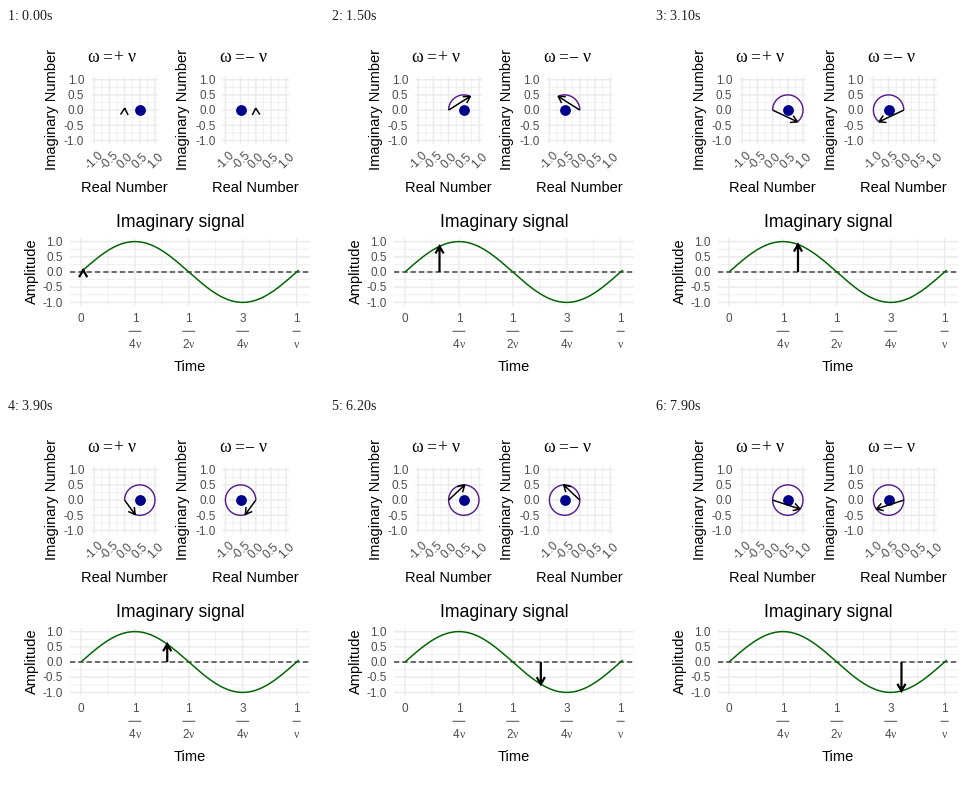
A matplotlib script that plays this animation: 318 by 362 pixels, repeating every 8 s.

```python
import numpy as np
import matplotlib.pyplot as plt
from matplotlib.animation import FuncAnimation

W, H, DPI = 318, 362, 100
FRAMES, INTERVAL = 80, 100
PX = 72 / DPI                      # points per pixel
UNIT = 30.4                        # pixels per data unit
TICKS = np.linspace(-1, 1, 5)
MINOR = TICKS[:-1] + 0.25
GRID, GREY = "#ebebeb", "#4d4d4d"
AXIS, SMALL, TITLE = 14.67, 11.73, 17.6

fig = plt.figure(figsize=(W / DPI, H / DPI), dpi=DPI, facecolor="white")
ax = fig.add_axes([0, 0, 1, 1])
ax.set_xlim(0, W)
ax.set_ylim(H, 0)
ax.axis("off")


def line(x, y, color, width, z=1, **kw):
    kw.setdefault("solid_capstyle", "butt")
    return ax.plot(x, y, color=color, lw=width * PX, zorder=z, snap=False, **kw)[0]


def label(x, y, s, size, color="black", ha="center", va="baseline",
          rot=0, font="Liberation Sans"):
    ax.text(x, y, s, fontsize=size * PX, color=color, ha=ha, va=va,
            rotation=rot, rotation_mode="anchor", family=font, zorder=6)


def grid(x0, x1, y0, y1, xs, ys, width):
    for x in xs:
        line([x, x], [y0, y1], GRID, width)
    for y in ys:
        line([x0, x1], [y, y], GRID, width)


def y_labels(right, mid):
    for t in TICKS:
        label(right, mid - t * UNIT + 4.2, f"{t:.1f}", SMALL, GREY, ha="right")


def arrow(color, width):
    return line([], [], color, width, 5, solid_joinstyle="miter")


def set_arrow(art, x0, y0, x1, y1, size):
    """Shaft plus an open head with 30 degree barbs."""
    a = np.arctan2(y1 - y0, x1 - x0)
    barbs = a + np.pi + np.array([-1, 1]) * np.pi / 6
    bx, by = x1 + size * np.cos(barbs), y1 + size * np.sin(barbs)
    art.set_data([x0, x1, np.nan, bx[0], x1, bx[1]],
                 [y0, y1, np.nan, by[0], y1, by[1]])


class Plane:
    """Complex plane with a vector tracing a circle through the origin."""

    MID = 82.1

    def __init__(self, x0, sign, op):
        self.x0, self.sign = x0, sign
        half = 1.1 * UNIT
        box = (x0 - half, x0 + half, self.MID - half, self.MID + half)
        for ts, w in ((MINOR, 0.71), (TICKS, 1.42)):
            grid(*box, x0 + ts * UNIT, self.MID - ts * UNIT, w)
        y_labels(x0 - 40.3, self.MID)
        for t in TICKS:
            label(x0 + t * UNIT + 0.5, 133, f"{t:.1f}", SMALL, GREY,
                  va="center", rot=45)
        label(x0, 164, "Real Number", AXIS)
        label(x0 - 69, 81, "Imaginary Number", AXIS, rot=90)
        for dx, s in zip((-31, -17, -6.4, 7.5), ("ω", "=", op, "ν")):
            label(x0 + dx, 34, s, TITLE, font="Liberation Serif")
        self.trail = line([], [], "#551a8b", 1.42, 3)
        ax.plot(x0 + sign * UNIT / 2, self.MID, "o", ms=10.8 * PX, mew=0,
                color="#00008b", zorder=4)
        self.vec = arrow("black", 1.5)

    def point(self, th):
        x = self.x0 + self.sign * UNIT * np.sin(th) ** 2
        return x, self.MID - UNIT * np.sin(th) * np.cos(th)

    def update(self, th):
        self.trail.set_data(*self.point(np.linspace(0, min(th, np.pi), 120)))
        set_arrow(self.vec, self.x0, self.MID, *self.point(th), 7.6)


planes = [Plane(118.6, 1, "+"), Plane(249.8, -1, "−")]

# Signal panel
X0, SPAN, MID = 75.0, 215.6, 244.0
box = (64, 303.7, MID - 1.1 * UNIT, MID + 1.1 * UNIT)
quarters = X0 + SPAN * np.arange(5) / 4
grid(*box, quarters[:-1] + SPAN / 8, MID - MINOR * UNIT, 0.71)
grid(*box, quarters, MID - TICKS * UNIT, 1.42)
y_labels(57, MID)
label(174.5, 199.3, "Imaginary signal", TITLE)
label(184, 343, "Time", AXIS)
label(29.5, 243.5, "Amplitude", AXIS, rot=90)

label(X0, 294, "0", SMALL, GREY)
for x, num, den in zip(quarters[1:], "1131", ("4", "2", "4", "")):
    bar = 6.4 if den else 4
    label(x, 294, num, SMALL, GREY)
    line([x - bar, x + bar], [303.3, 303.3], GREY, 1)
    label(x - 3.1, 320, den, SMALL, GREY)
    label(x + (3.2 if den else 0), 320, "ν", SMALL, GREY, font="Liberation Serif")

line(box[:2], [MID, MID], "#262626", 1.3, 2, dashes=(4, 2.4),
     dash_capstyle="butt")
t = np.linspace(0, 1.01, 300)
line(X0 + SPAN * t, MID - UNIT * np.sin(2 * np.pi * t), "#006400", 1.5, 3)
pulse = arrow("black", 2.2)


def update(i):
    phase = (i + 1) / 100
    th = 2 * np.pi * phase
    for p in planes:
        p.update(th)
    x = X0 + SPAN * phase
    set_arrow(pulse, x, MID, x, MID - UNIT * np.sin(th), 8.2)
    return [pulse] + [a for p in planes for a in (p.trail, p.vec)]


anim = FuncAnimation(fig, update, frames=FRAMES, interval=INTERVAL,
                     repeat=True, repeat_delay=0, init_func=lambda: update(0))
plt.show()
```
